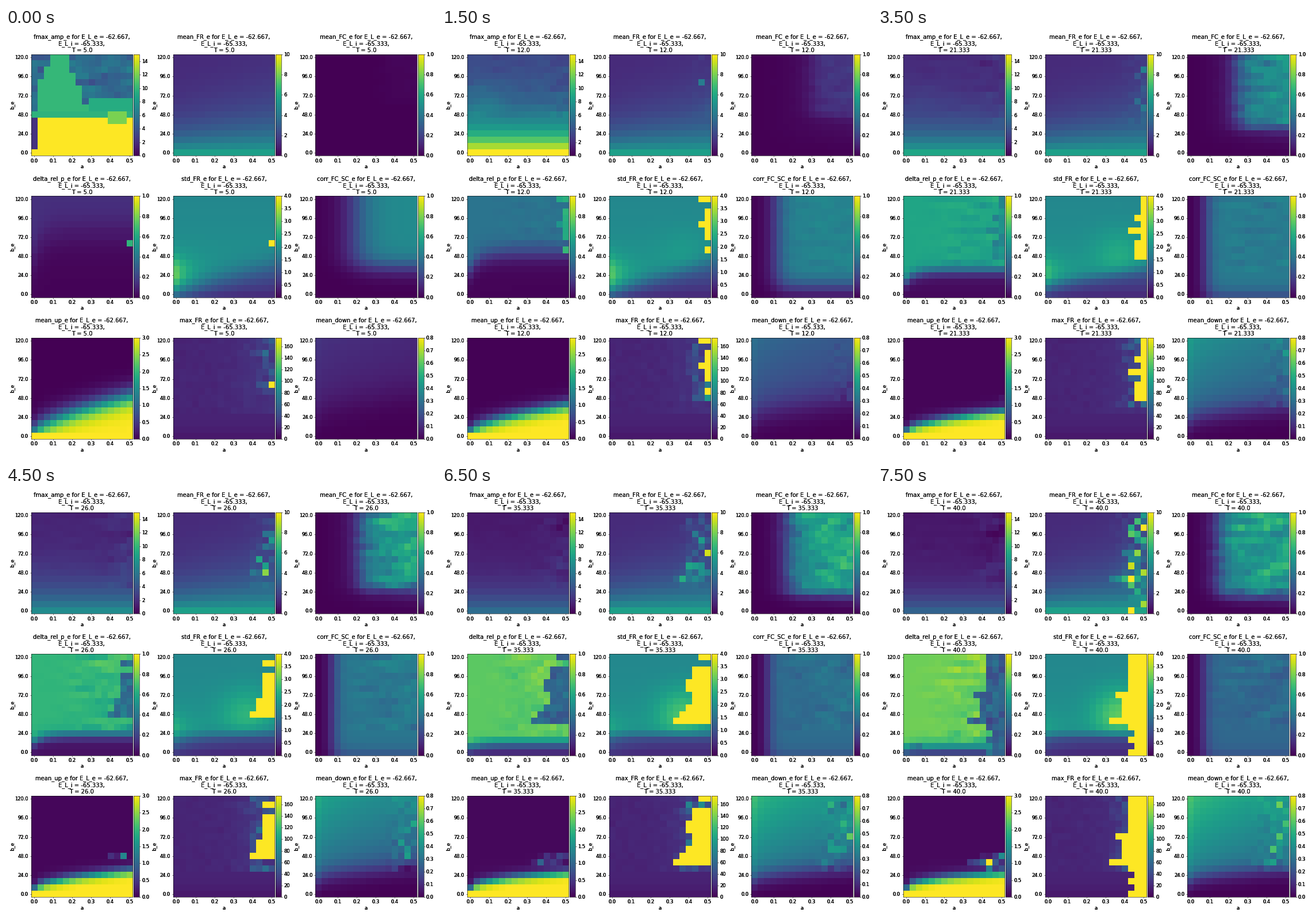
A matplotlib script for the animation above (8000 ms loop, 748 by 748 pixels).

```python
import numpy as np
import matplotlib.pyplot as plt
from matplotlib.animation import FuncAnimation

SIZE, N, FRAMES, DPI = 748, 16, 16, 50
PT = 72 / DPI  # points per pixel
plt.rcParams["font.family"] = "DejaVu Sans"

# name, upper limit, colour bar tick step, tick format
PANELS = [
    ("fmax_amp_e", 15, 2, "{:.0f}"),
    ("mean_FR_e", 10, 2, "{:.0f}"),
    ("mean_FC_e", 1, 0.2, "{:.1f}"),
    ("delta_rel_p_e", 1, 0.2, "{:.1f}"),
    ("std_FR_e", 4, 0.5, "{:.1f}"),
    ("corr_FC_SC_e", 1, 0.2, "{:.1f}"),
    ("mean_up_e", 3, 0.5, "{:.1f}"),
    ("max_FR_e", 175, 20, "{:.0f}"),
    ("mean_down_e", 0.8, 0.1, "{:.1f}"),
]

R, C = np.mgrid[0:N, 0:N]   # row from the top, column
J = N - 1 - R               # row from the bottom
U, V = C / 15, J / 15


def sig(x):
    return 1 / (1 + np.exp(-x))


def bump(c, j, wc, wj):
    return np.exp(-((C - c) / wc) ** 2 - ((J - j) / wj) ** 2)


def burst_mask(k, s, rng):
    """Ragged block of saturated cells growing in from the right edge."""
    profile = 0.6 + 0.7 * np.exp(-((np.arange(N) - 8) / 4) ** 2)
    depth = (0.2 + 3.3 * s) * profile + rng.normal(0, 0.8, N)
    reach = (J > 7.5 - 4 * s) | (k == FRAMES - 1)
    return (C >= N - np.round(depth)[:, None]) & reach


def first_frequency(streaks):
    """Flat plateaus of the shortest period."""
    z = 5.4 + 0.7 * streaks
    z[(C >= 1) & (C >= 3 - R / 2) & (C <= 5 + 0.4 * R)] = 10
    z[(abs(J - 7.5) < 1) & (C >= 9)] = 9.3
    z[J == 6] = 9.7
    z[J < 6] = 15
    z[(C == 0) & (J > 0) & (J < 6)] = 2.2
    z[(abs(J - 5.5) < 1) & (abs(C - 13) < 2)] = 12
    return z


def fields(k):
    rng = np.random.default_rng(40 + k)
    T, s = 5 + 7 * k / 3, k / (FRAMES - 1)
    ease = (1 - np.exp(-2 * s)) / (1 - np.exp(-2))
    fade = np.exp(-k / 3)
    shift = sig(k - 7)

    def mix(start, end):
        return start + (end - start) * ease

    noise = rng.normal(size=(N, N))
    streaks = (noise + np.roll(noise, 1, 1) + np.roll(noise, 2, 1)) / 1.73
    burst = burst_mask(k, s, rng)
    spikes = burst * noise ** 2 * s
    near = sig((C - 13 + 1.5 * s) / 0.8) * (J > mix(6.5, 3.2))

    if k == 0:
        freq = first_frequency(streaks)
    else:
        freq = (36 + 152 * np.exp(-J / (4.8 - 0.04 * T))) / T
        freq = freq + 18 / T * bump(2, 8, 3, 2.5) * fade * 2
        freq = freq + streaks * (2 / T * (J > 5) + 0.3 * near)

    fire = 1.15 + 4.5 * np.exp(-J / (3.3 + 1.8 * U))
    fire = fire + 0.6 * s * near * np.abs(noise) + 1.5 * spikes

    region = sig((C - 10 + 5.3 * s) / 0.9) * sig((J - mix(8, 2.4)) / 0.5)
    fc = 0.48 * sig((T - 15) / 3) * region * (1 + 0.12 * streaks)
    fc = fc + 0.1 * ease * U * sig(J - 2)

    split = mix(10, 1.1) * (1 - 0.4 * np.exp(-C / 1.5))
    delta = mix(0.14, 0.78) * sig((J - split) / (0.4 + 1.2 * fade))
    delta = delta + (0.01 + 0.15 * s ** 3) * (J < split)
    delta = delta + 0.04 * ease * streaks * sig((C - 6) / 1.5) * (J > split + 0.5)
    delta = np.where(burst, 0.64 - 0.33 * shift + 0.04 * noise, delta)

    low = 0.5 + 0.12 * J
    line = 0.8 + 2.1 * shift + 4.4 * (1 - shift) * U
    rise = sig((J - line) / mix(1.1, 0.35))
    std = low + (2.1 - 0.25 * V - low) * rise
    std = std + 1.1 * (1 - 0.75 * s) * np.exp(-C / 2.5 - ((J - 3) / 3) ** 2)
    std = std + s * bump(11, 6, 4, 4) * rise
    std = np.where(burst, 4, std)

    corr = (0.48 - 0.14 * s) * sig((C - 2.2 - 3.8 * fade) / (0.6 + 0.9 * fade))
    corr = corr * sig((J + 1.6 - 6.1 * np.exp(-k / 4)) / 0.9)
    corr = corr * (1 + 0.08 * ease * streaks * sig((C - 5) / 1.5) * (J > 3))

    height = 0.7 + (2.4 + 3.1 * np.exp(-k / 5)) * U ** (0.7 - 0.3 * s)
    up = 3 * sig((height - J) / (0.4 + 0.5 * fade)) + 0.08 * s
    up = np.where(J == 0, 3, up + 0.4 * spikes * (abs(J - 5) < 2))

    peak = 18 - 6 * np.exp(-J / 1.5) + 6 * sig((C - 9) / 2) * (J > 3)
    peak = peak + near * np.abs(noise) * 24 + noise * (J > 3)
    peak = np.where(burst, 175, peak)

    floor = mix(3, 2.1) + mix(3.5, 1.8) * np.sqrt(U)
    down = mix(0.12, 0.57) * (0.55 + 0.45 * V) * (1 - 0.25 * np.sqrt(U))
    down = down * sig((J - floor) / mix(1.6, 0.8))
    down = down + 0.05 * ease * near * noise + 0.04 * spikes * (J > 3)

    return [freq, fire, fc, delta, std, corr, up, peak, down]


fig = plt.figure(figsize=(SIZE / DPI, SIZE / DPI), dpi=DPI, facecolor="white")


def add_axes(x, y, w, h):
    ax = fig.add_axes([x / SIZE, 1 - (y + h) / SIZE, w / SIZE, h / SIZE])
    ax.tick_params(labelleft=False, labelbottom=False)
    return ax


def label(x, y, text, px=8.33, copies=3, **style):
    """Overlaid copies give the heavy, hard-edged lettering."""
    style = {"ha": "center", "va": "baseline", **style}
    return [fig.text(x / SIZE, 1 - y / SIZE, text, fontsize=px * PT, **style)
            for _ in range(copies)]


def build_panel(index, name, top, step, fmt):
    x, y = 43.6 + 247.3 * (index % 3), 45.8 + 246.5 * (index // 3)
    side = 176.5
    cell, mid, bottom = side / N, x + side / 2, y + side

    ax = add_axes(x, y, side, side)
    image = ax.imshow(np.zeros((N, N)), cmap="viridis", vmin=0, vmax=top,
                      aspect="auto", interpolation="nearest")
    ax.set_xticks(range(0, N, 3))
    ax.set_yticks(range(0, N, 3))
    for i in range(0, N, 3):
        label(x + (i + 0.5) * cell, bottom + 11.2, f"{i / 30:.1f}")
        label(x - 4.9, bottom - (i + 0.5) * cell + 3, f"{8 * i:.1f}", ha="right")
    label(mid, bottom + 21.5, "a")
    label(x - 33, y + side / 2, "b_e", rotation=90, va="center")

    bar = add_axes(x + 178.5, y, 9.8, side)
    bar.imshow(np.linspace(0, 1, 256)[:, None], cmap="viridis", aspect="auto",
               origin="lower", extent=(0, 1, 0, top))
    ticks = np.arange(0, top + step / 100, step)
    bar.set_xticks([])
    bar.set_yticks(ticks)
    bar.yaxis.tick_right()
    bar.tick_params(labelright=False)
    for value in ticks:
        label(x + 192.6, bottom - value / top * side + 3, fmt.format(value), ha="left")

    label(mid, y - 27.5, f"{name} for E_L_e = -62.667,", 10, 2)
    label(mid, y - 15.5, "E_L_i = -65.333,", 10, 2)
    return image, label(mid, y - 3.5, "", 10, 2)


panels = [build_panel(i, *spec) for i, spec in enumerate(PANELS)]


def update(k):
    caption = f"T = {round(5 + 7 * k / 3, 3)}"
    for (image, captions), grid in zip(panels, fields(k)):
        image.set_data(grid)
        for text in captions:
            text.set_text(caption)
    return []


anim = FuncAnimation(fig, update, frames=FRAMES, interval=500, repeat=True,
                     repeat_delay=0, blit=False)
plt.show()
```
